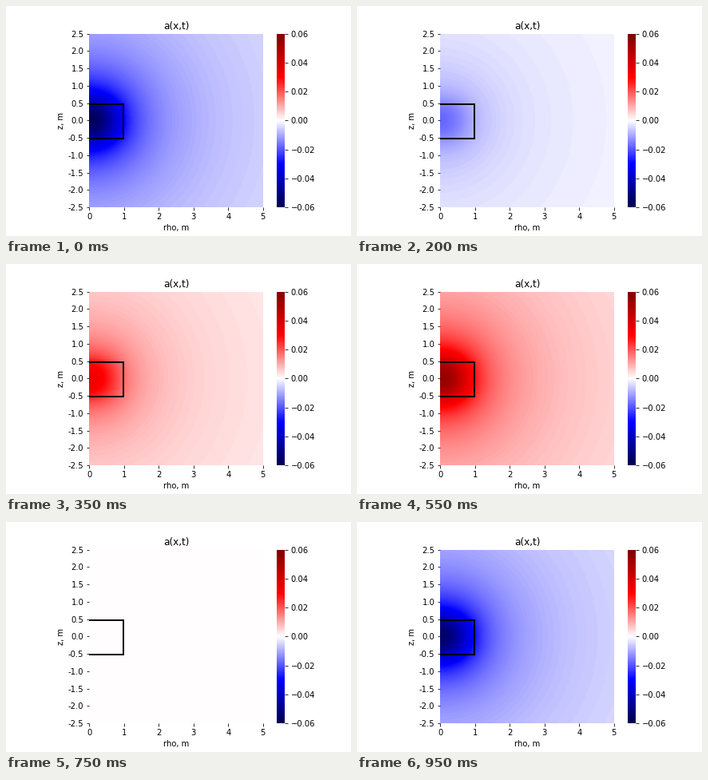
Recreate the animation shown at these times as a matplotlib script. Size 432 by 288 pixels, loop 1 s.

```python
import numpy as np
import matplotlib.pyplot as plt
from matplotlib.animation import FuncAnimation

FRAMES, INTERVAL = 20, 50
AMPLITUDE, LIMIT = 0.058, 0.06
HALF_HEIGHT = 0.5
CELLS = 217
BESSEL_ZERO = 2.404825557695773

plt.rcParams.update({
    "font.family": "DejaVu Sans",
    "font.size": 10,
    "figure.subplot.bottom": 0.125,
})


def bessel0(x):
    """J0 from its integral form."""
    angles = (np.arange(120) + 0.5) * np.pi / 120
    return sum(np.cos(x * np.sin(a)) for a in angles) / len(angles)


def cylinder_field(rho, z):
    """Static field of a cylinder whose source falls off as J0(j * rho)."""
    k = np.arange(0.025, 30, 0.05)
    source = bessel0(k) / (BESSEL_ZERO**2 - k**2)
    dist = np.abs(z)[:, None]
    inside = 1 - np.exp(-k * HALF_HEIGHT) * np.cosh(k * np.minimum(dist, HALF_HEIGHT))
    outside = np.exp(-k * dist) * np.sinh(k * HALF_HEIGHT)
    axial = np.where(dist < HALF_HEIGHT, inside, outside) / k
    return (axial * source) @ bessel0(np.outer(k, rho))


cell = 5 / CELLS
rho = (np.arange(CELLS) + 0.5) * cell
z = rho - 2.5
field = cylinder_field(rho, z)
field *= AMPLITUDE / field.max()

fig, ax = plt.subplots(figsize=(6, 4), dpi=72)
image = ax.imshow(-field, cmap="seismic", vmin=-LIMIT, vmax=LIMIT,
                  origin="lower", extent=(0, 5, -2.5, 2.5))
bar = fig.colorbar(image, ax=ax)
bar.outline.set_visible(False)
bar.set_ticks(np.linspace(-LIMIT, LIMIT, 7))

# cavity outline
ax.plot([0, 0.985, 0.985, 0], [0.475, 0.475, -0.525, -0.525],
        color="black", lw=2, solid_joinstyle="miter", solid_capstyle="butt")

ax.set(xlim=(0, 5), ylim=(-2.5, 2.5), title="a(x,t)", xlabel="rho, m", ylabel="z, m")
ax.set_xticks(range(6))
heights = np.linspace(-2.5, 2.5, 11)
ax.set_yticks(heights, [f"{h:.1f}" for h in heights])
ax.spines[:].set_visible(False)


def update(frame):
    image.set_data(-field * np.cos(2 * np.pi * frame / FRAMES))
    return [image]


anim = FuncAnimation(fig, update, frames=FRAMES, interval=INTERVAL, repeat=True)
plt.show()
```
